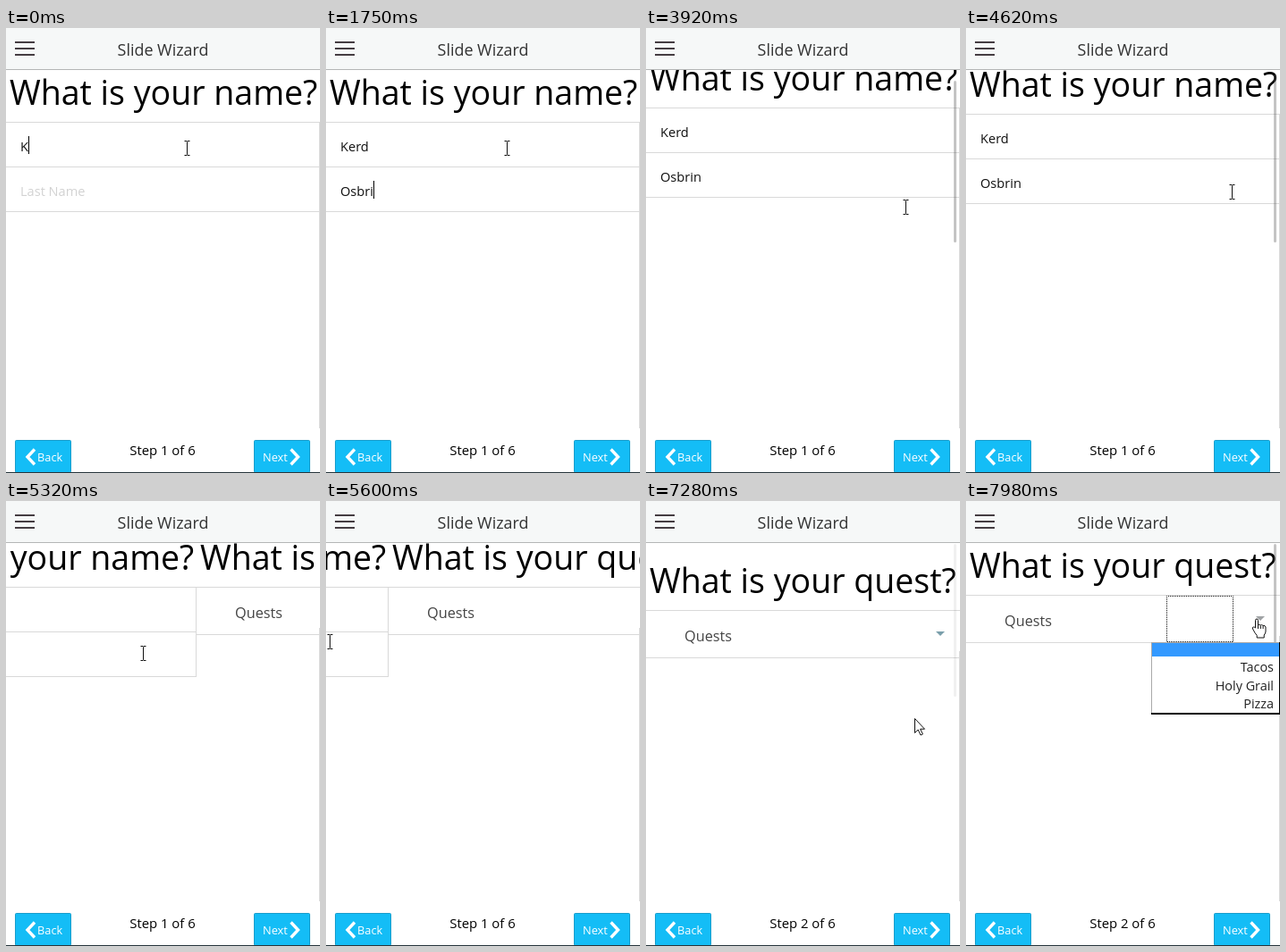
Recreate the animation shown at these times as an HTML page. Size 351x498 px, loop 8 s.

```html
<!DOCTYPE html>
<html lang="en">
<head>
<meta charset="utf-8">
<title>Slide Wizard</title>
<style>
  html, body { margin: 0; width: 100%; height: 100%; overflow: hidden; background: #fff; }
  svg { display: block; width: 351px; height: 498px; font-family: "Open Sans", "Noto Sans", sans-serif; }
  text { white-space: pre; }
  .heading { font-size: 37.5px; }
  .field { font-size: 14.6px; fill: #111; }
  .hint { fill: #d2d2d2; }
  .rule { fill: #d9d9d9; }
  .button rect { fill: #14bdf6; stroke: #1a9dcb; }
  .button text { font-size: 12.8px; fill: #fff; }
  .button path { fill: none; stroke: #fff; stroke-width: 3.4; }
  .options { font-size: 14.4px; fill: #222; text-anchor: end; }
  .pointer { fill: #fff; stroke: #111; stroke-linejoin: round; }
</style>
</head>
<body>
<svg viewBox="0 0 351 498">
  <defs>
    <clipPath id="view"><rect y="47" width="351" height="401"/></clipPath>
    <clipPath id="drop"><rect id="dropSize" x="207" y="158" width="144" height="81"/></clipPath>
  </defs>
  <rect width="351" height="498" fill="#fff"/>

  <g clip-path="url(#view)">
    <g id="scroll">
      <rect class="rule" x="350" y="151" width="1" height="320"/>
      <g id="pageOne">
        <text class="heading" x="4" y="86">What is your name?</text>
        <rect class="rule" y="105" width="351" height="1"/>
        <rect class="rule" y="155" width="351" height="1"/>
        <rect class="rule" y="205" width="351" height="1"/>
        <rect class="rule" x="350" y="105" width="1" height="101"/>
        <text id="first" class="field" x="16" y="138"></text>
        <text id="last" class="field" x="16" y="188"></text>
        <text id="hint" class="field hint" x="16" y="188">Last Name</text>
        <rect id="caret" width="1" height="20"/>
      </g>
      <g id="pageTwo">
        <text class="heading" x="4" y="86">What is your quest?</text>
        <rect class="rule" y="105" width="351" height="1"/>
        <rect class="rule" y="158" width="351" height="1"/>
        <text x="43" y="140" font-size="16.3" fill="#444">Quests</text>
        <path id="arrow" d="M324 129h10l-5 5z"/>
      </g>
    </g>
    <rect id="thumb" x="344" width="3" rx="1.5" fill="#555"/>
  </g>

  <rect width="351" height="46" fill="#f6f8f8"/>
  <rect y="46" width="351" height="1" fill="#b4b6b6"/>
  <path d="M10 16h22M10 23h22M10 30h22" stroke="#453d42" stroke-width="2"/>
  <text x="175.5" y="31" font-size="17.9" fill="#333" text-anchor="middle">Slide Wizard</text>

  <g class="button">
    <rect x="10.5" y="461.5" width="62" height="36" rx="1"/>
    <path d="M32 471.5l-8 8.5 8 8.5"/>
    <text x="35" y="485">Back</text>
    <rect x="277.5" y="461.5" width="62" height="36" rx="1"/>
    <path d="M318.5 471.5l8 8.5-8 8.5"/>
    <text x="287" y="485">Next</text>
  </g>
  <text id="step" x="175" y="478" font-size="14.9" text-anchor="middle"></text>
  <rect y="497" width="351" height="1" fill="#26343b"/>

  <rect id="focus" x="224.5" y="106.5" width="74" height="51" fill="none" stroke="#111" stroke-dasharray="1" stroke-dashoffset=".5"/>
  <g id="menu" clip-path="url(#drop)">
    <rect x="207" y="158" width="144" height="81" fill="#000"/>
    <rect x="207" y="158" width="143" height="79" fill="#a9a9a9"/>
    <rect x="208" y="159" width="142" height="78" fill="#fff"/>
    <rect x="208" y="159" width="142" height="15" fill="#39f"/>
    <g class="options">
      <text x="344" y="191">Tacos</text>
      <text x="344" y="212">Holy Grail</text>
      <text x="344" y="232">Pizza</text>
    </g>
  </g>

  <g id="cursor">
    <path id="beam" transform="translate(.5 .5)" d="M-3 -8h2.5l.5 1 .5-1h2.5M0 -7v14M-3 8h2.5l.5-1 .5 1h2.5" fill="none" stroke="#111"/>
    <path id="pointer" class="pointer" d="M.5 .5v16l3.7-3.5 2.8 6 2.4-1.1-2.8-5.7h4.9z"/>
    <path id="hand" class="pointer" d="M-1.5 10V1.5q0-1.5 1.5-1.5t1.5 1.5V7q1-1.2 2.8 0 1.4-1 2.8 .5 2.4-.6 2.9 1.5v5q0 2-1.8 4v3h-8v-2.5q-2.6-3-4.7-7.5-.8-2 .8-2 1.2 0 2.2 1zM1.5 7v4M4.3 7.5v3.5M7.1 8v3"/>
  </g>
</svg>

<script>
const LOOP = 8000, TICK = 70, WIDTH = 351, OVERFLOW = 9;
const KEY = 140, BLINK = 490, TAB = 630, RETYPE = 1190, TYPED = 1820;
const ui = {};
document.querySelectorAll('[id]').forEach(el => ui[el.id] = el);

// Eased hand movements; bow bends the path sideways in `waves` half sine waves
const strokes = [
  { from: 2520, to: 3430, a: [202, 134], b: [286, 242], bow: [56, 20], waves: 1 },
  { from: 3430, to: 4620, a: [286, 242], b: [297, 183], bow: [0, -38], waves: 2 },
  { from: 4900, to: 5880, a: [297, 183], b: [-69, 150], bow: [0, 0], waves: 1 },
  { from: 6090, to: 6580, a: [4, 158], b: [280, 163], bow: [140, -100], waves: 1 },
  { from: 6860, to: 7770, a: [280, 163], b: [325, 132], bow: [0, 94], waves: 1 }
];

const part = (t, from, to) => Math.min(1, Math.max(0, (t - from) / (to - from)));
const ease = (t, from, to) => { const k = part(t, from, to); return k * k * (3 - 2 * k); };
const wave = (t, from, to, waves) => Math.sin(Math.PI * waves * part(t, from, to));
const within = (t, from, to) => t >= from && t < to;

const scrollAt = t =>
  -OVERFLOW * (ease(t, 3430, 4620) - ease(t, 6860, 7630))
  - 24 * wave(t, 3430, 4620, 2) + 21 * wave(t, 6860, 7630, 1);
const slideAt = t => -WIDTH * ease(t, 4900, 5880);
const thumbAt = t => .35 * (ease(t, 3430, 3570) - ease(t, 4620, 4760) + ease(t, 7210, 7420));

function cursorAt(t) {
  const s = strokes.findLast(s => s.from <= t) || strokes[0];
  const k = ease(t, s.from, s.to), bend = wave(t, s.from, s.to, s.waves);
  return s.a.map((v, i) => v + (s.b[i] - v) * k + s.bow[i] * bend);
}

const show = (el, on) => el.setAttribute('display', on ? 'inline' : 'none');
const move = (el, x, y) => el.setAttribute('transform', `translate(${Math.round(x)} ${Math.round(y)})`);
const typed = (text, start, t) => text.slice(0, Math.max(0, Math.floor((t - start) / KEY) + 1));

function drawForm(t) {
  ui.first.textContent = typed('Kerd', -TICK, t);
  ui.last.textContent = typed('Osbrin', RETYPE, t);
  show(ui.hint, t < RETYPE);

  const field = t < TAB ? ui.first : ui.last;
  const width = field.textContent ? field.getComputedTextLength() : 0;
  ui.caret.setAttribute('x', Math.round(16 + width));
  ui.caret.setAttribute('y', t < TAB ? 121 : 171);
  const idle = Math.max(0, t - (t < RETYPE ? TAB : TYPED));
  show(ui.caret, t < 3290 && Math.floor(idle / BLINK) % 2 === 0);
}

function drawPages(t) {
  const dy = scrollAt(t), dx = slideAt(t);
  move(ui.scroll, 0, dy);
  move(ui.pageOne, dx, 0);
  move(ui.pageTwo, dx + WIDTH, 0);
  ui.arrow.setAttribute('fill', within(t, 6300, 7700) ? '#7a9fab' : '#a0a3a5');
  ui.step.textContent = `Step ${t < 5810 ? 1 : 2} of 6`;

  // The thumb shrinks while the page is pulled past either end
  const below = Math.max(0, -OVERFLOW - dy), above = Math.max(0, dy);
  ui.thumb.setAttribute('y', 48 + part(-dy, 0, OVERFLOW) * 4 + below);
  ui.thumb.setAttribute('height', 188 - below - above);
  ui.thumb.setAttribute('opacity', thumbAt(t));
}

function drawMenu(t) {
  show(ui.focus, t >= 7840);
  show(ui.menu, t >= 7840);
  ui.dropSize.setAttribute('height', 81 * part(t, 7770, 7980));
}

function drawCursor(t) {
  const [x, y] = cursorAt(t);
  const hand = t >= 7700, beam = t < 6000 && y < 205;
  move(ui.cursor, x, y);
  show(ui.hand, hand);
  show(ui.beam, beam);
  show(ui.pointer, !hand && !beam);
}

const start = performance.now();
function draw(now) {
  const t = Math.floor((Math.max(0, now - start) % LOOP) / TICK) * TICK;
  drawForm(t);
  drawPages(t);
  drawMenu(t);
  drawCursor(t);
  requestAnimationFrame(draw);
}
draw(start);
</script>
</body>
</html>
```
